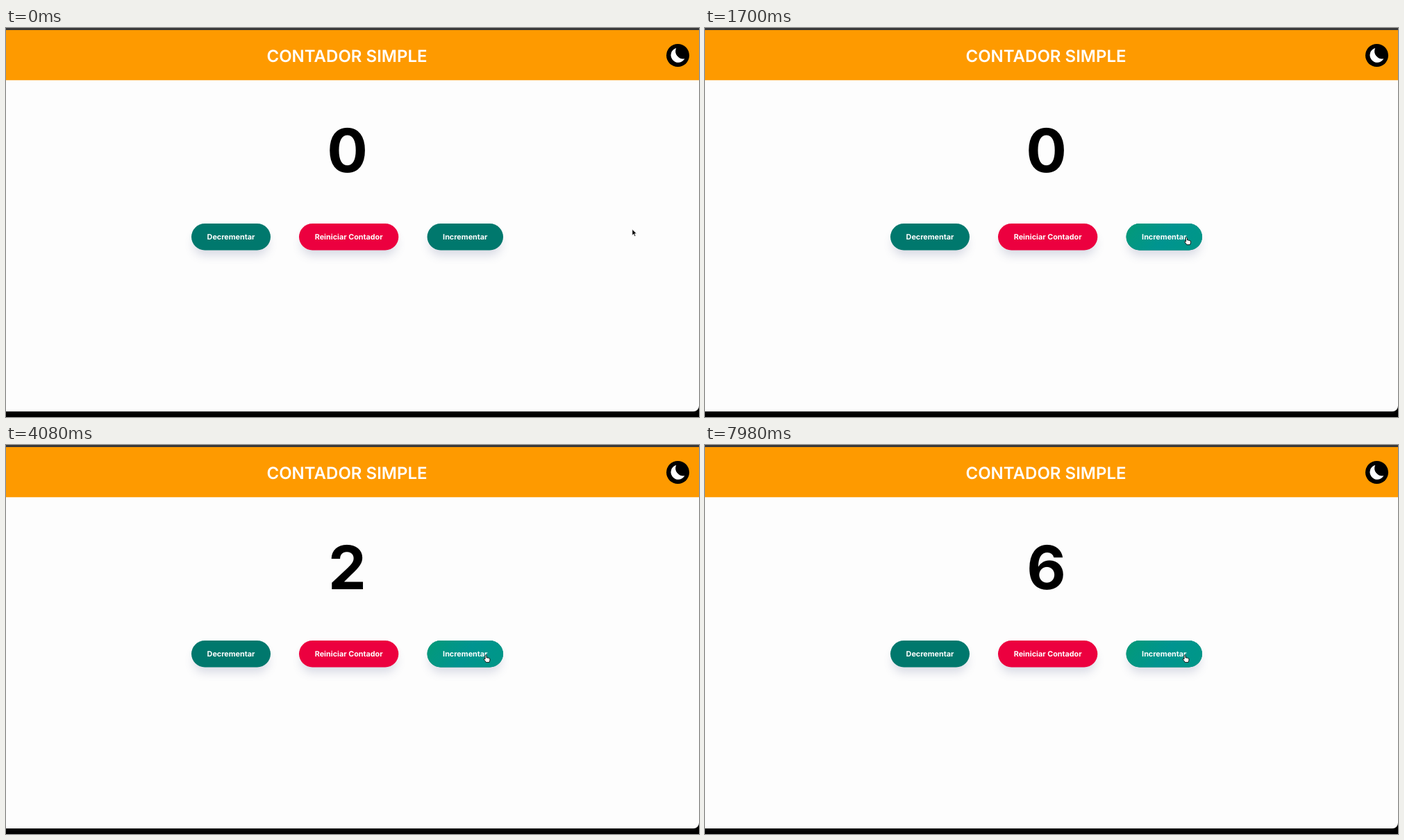
Recreate the animation shown at these times as an HTML page. Size 998 px wide and 561 px high, loop 8 s.

```html
<!DOCTYPE html>
<html lang="es">
<head>
<meta charset="utf-8">
<title>Contador simple</title>
<style>
  html, body { margin: 0; width: 100%; height: 100%; overflow: hidden; background: #000; }
  svg { display: block; width: 100vw; height: 100vh; }
  text {
    font-family: Inter, "Liberation Sans", sans-serif;
    font-weight: 700;
    text-anchor: middle;
    text-rendering: geometricPrecision;
  }
  .title { font-size: 24px; font-weight: 600; fill: #fff; }
  .count { font-size: 87px; }
  .label { font-size: 10.8px; fill: #fff; }
  .shadow { fill: #4b5585; opacity: .2; filter: blur(7px); }
</style>
</head>
<body>
<svg viewBox="0 0 998 561" preserveAspectRatio="none">
  <defs>
    <linearGradient id="hover" x2="1" y2=".25">
      <stop offset="0" stop-color="#049a78"/>
      <stop offset=".6" stop-color="#009490"/>
      <stop offset="1" stop-color="#009689"/>
    </linearGradient>
  </defs>
  <path fill="#fdfdfd" d="M0 75H998V545A8 8 0 0 1 990 553H0Z"/>
  <rect width="998" height="4" fill="#393939"/>
  <rect y="3" width="998" height="72.3" fill="#fe9a00"/>
  <text class="title" x="491" y="48.7">CONTADOR SIMPLE</text>

  <circle cx="967.5" cy="39.5" r="16.5"/>
  <path fill="#fff" d="M965.2 29A10.6 10.6 0 1 0 977.4 44.3A11 11 0 0 1 965.2 29Z"/>

  <text class="count" id="count" x="491.5" y="208.3">0</text>
  <g id="buttons"></g>

  <path id="arrow" stroke="#fff" stroke-width=".8" d="M0 0V9L2.1 7.1L3.5 10.3L5.1 9.6L3.7 6.5H6.5Z"/>
  <path id="hand" fill="#fff" stroke="#000" stroke-width=".9" stroke-linejoin="round"
    d="M-1 1Q0 -.8 1 1V4.2Q2 3.5 2.8 4.6Q3.8 4 4.5 5Q5.8 4.6 5.9 6V8Q5.6 9 5 10.8H.2Q-.6 9-2.6 7.1Q-3.3 5.6-1.8 5.7L-1 6.4Z"/>
</svg>
<script>
const LOOP = 8000;
const FIRST_CLICK = 2560, CLICK_GAP = 960;
const $ = id => document.getElementById(id);
const clamp = v => Math.min(1, Math.max(0, v));
const smooth = v => { v = clamp(v); return v * v * (3 - 2 * v); };

function button(label, x, width, color, hover) {
  const box = `x="${x}" y="282" width="${width}" height="38.5" rx="19.25"`;
  return `<rect class="shadow" x="${x + 3}" y="295" width="${width - 6}" height="33" rx="16"/>
    <rect ${box} fill="${color}"/>
    ${hover ? `<rect id="glow" ${box} fill="url(#hover)"/>` : ''}
    <text class="label" x="${x + width / 2}" y="305.2">${label}</text>`;
}

$('buttons').innerHTML =
  button('Decrementar', 267, 114, '#00786d') +
  button('Reiniciar Contador', 422, 143.3, '#ec003f') +
  button('Incrementar', 606.6, 109.4, '#00786d', true);

// Pointer hotspot: sweep to the button, then a small settling drift.
function pointer(t) {
  const sweep = smooth((t - 300) / 1200), settle = smooth((t - 1750) / 600);
  return [901.8 - 208.3 * sweep - 2.5 * settle, 290.2 + 11.6 * sweep + .8 * settle];
}

function draw(now) {
  const t = now % LOOP;
  const [x, y] = pointer(t);
  const over = x < 716;
  $('glow').style.opacity = over ? smooth((t - 1190) / 150) : 0;
  for (const [id, shown] of [['arrow', !over], ['hand', over]]) {
    $(id).setAttribute('transform', `translate(${x} ${y})`);
    $(id).style.display = shown ? '' : 'none';
  }
  $('count').textContent = Math.max(0, Math.floor((t - FIRST_CLICK) / CLICK_GAP) + 1);
  requestAnimationFrame(draw);
}
draw(performance.now());
</script>
</body>
</html>
```
